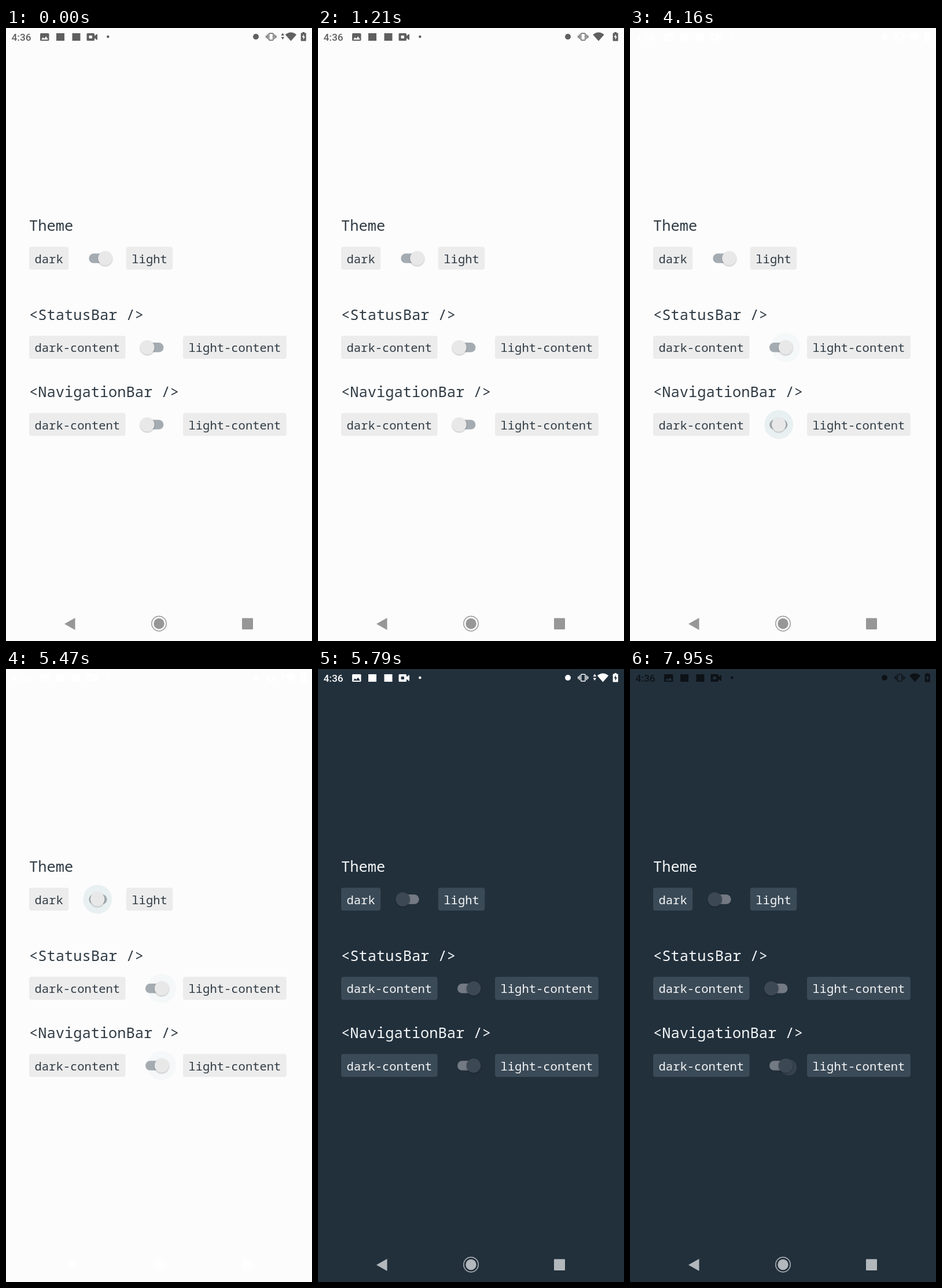
Animation of 529 by 1058 pixels, one loop 8 s. Source, as an HTML page:

```html
<!DOCTYPE html>
<html lang="en">
<head>
<meta charset="utf-8">
<title>System bars demo</title>
<style>
  html, body { margin: 0; width: 100%; height: 100%; overflow: hidden; }
  svg {
    display: block; width: 529px; height: 1058px; background: var(--bg);
    --bg: #fcfcfc; --box: #ececec; --text: #303b44; --track: #a4abb1;
    --thumb: #e8e8e8; --shade: rgba(0, 0, 0, .28); --ripple: #e9f0f1;
  }
  svg.dark {
    --bg: #22303c; --box: #3b4a57; --text: #f4f6f7; --track: #737a83;
    --thumb: #3c4955; --shade: rgba(0, 0, 0, .35); --ripple: #35424f;
  }
  text { font: 20.5px "Noto Sans Mono", "DejaVu Sans Mono", monospace; fill: var(--text); white-space: pre; }
  .title { font-size: 25.4px; font-weight: 500; }
  .box { fill: var(--box); }
  .track { fill: var(--track); }
  .thumb { fill: var(--thumb); filter: drop-shadow(0 1px 1.2px var(--shade)); }
  #status, #nav { fill: currentColor; }
  #status text { font: 500 17.3px Roboto, sans-serif; fill: currentColor; }
  .cut { fill: var(--bg); }
  .line { fill: none; stroke: currentColor; stroke-width: 1.5; }
</style>
</head>
<body>
<svg id="stage" viewBox="0 0 529 1058">
  <g id="status">
    <text x="9.5" y="21.7">4:36</text>
    <rect x="59" y="9" width="15.5" height="13" rx="1.6"/>
    <path class="cut" d="M61 20l3-4 2.2 2.5 3-4 3.600 5.500z"/>
    <rect x="87" y="9" width="14" height="13"/>
    <rect x="114.500" y="9" width="14" height="13"/>
    <path d="M141 9h10.500q1.500 0 1.500 1.500v3l5-3.500v11l-5-3.500v3q0 1.500-1.500 1.500H141q-1.500 0-1.500-1.500v-10Q139.500 9 141 9z"/>
    <rect class="cut" x="143.500" y="13" width="5.500" height="5" rx="1"/>
    <circle cx="176.300" cy="15" r="2.300"/>
    <g id="left">
      <circle cx="432" cy="15" r="5"/>
      <rect class="line" x="454.500" y="9.200" width="7.500" height="11.800" rx="1"/>
      <path class="line" d="M452 11v8M449.800 13v4M464.500 11v8M466.700 13v4"/>
    </g>
    <path id="arrows" d="M475.500 13l2.800-4.500 2.800 4.500zM475.500 15.500l2.800 4.500 2.800-4.500z"/>
    <path id="wifi" d="M-9.700 11.500Q0 3.500 9.700 11.500L0 22.500z"/>
    <path d="M512.500 7h3.500v1.600h2q.8 0 .8.800v12.300q0 .8-.8.800h-7.500q-.8 0-.8-.8V9.400q0-.8.8-.8h2z"/>
    <path class="cut" d="M514.800 10.500l-3 5.500h2v4.500l3.200-6h-2.200z"/>
  </g>
  <g id="nav">
    <path d="M101 1028.500L119.500 1018v21z"/>
    <circle cx="264.500" cy="1028" r="9.200"/>
    <circle class="line" cx="264.500" cy="1028" r="12.700"/>
    <rect x="408" y="1018.500" width="19" height="19.500" rx="1"/>
  </g>
</svg>
<script>
const LOOP = 8000, FPS = 19, SLIDE = 200, THEME_AT = 5500;
const stage = document.getElementById('stage');
const [status, nav, left, arrows, wifi] =
  ['status', 'nav', 'left', 'arrows', 'wifi'].map(id => document.getElementById(id));

// x, y: centre of the switch; on: state at the start; taps: times of each press
const rows = [
  { title: 'Theme', labels: ['dark', 'light'], x: 159, y: 397.5, right: 207.8, on: 1, taps: [5369] },
  { title: '<StatusBar />', labels: ['dark-content', 'light-content'], x: 256.700, y: 551.300, right: 306, on: 0, taps: [2110, 7369] },
  { title: '<NavigationBar />', labels: ['dark-content', 'light-content'], x: 256.700, y: 684.500, right: 306, on: 0, taps: [4055, 7947] },
];

function add(tag, attrs, content = '') {
  const el = document.createElementNS('http://www.w3.org/2000/svg', tag);
  set(el, attrs);
  el.textContent = content;
  return stage.appendChild(el);
}
function set(el, attrs) {
  for (const key in attrs) el.setAttribute(key, attrs[key]);
}
function smooth(p) {
  p = Math.min(1, Math.max(0, p));
  return p * p * (3 - 2 * p);
}

function chip(label, x, y) {
  add('rect', { class: 'box', x, y: y - 20, width: label.length * 12.3 + 19, height: 39.600, rx: 4 });
  add('text', { x: x + 9.5, y: y + 8 }, label);
}

for (const row of rows) {
  add('text', { class: 'title', x: 40, y: row.y - 47.500 }, row.title);
  chip(row.labels[0], 40, row.y);
  chip(row.labels[1], row.right, row.y);
  row.ripple = add('circle', {});
  row.track = add('rect', { class: 'track', x: row.x - 15.700, y: row.y - 8.200, width: 31.400, height: 16.500, rx: 8.200 });
  row.thumb = add('circle', { class: 'thumb', cy: row.y, r: 12.300 });
}

function drawSwitch(row, t, dark) {
  let pos = row.on, tap = -1;
  for (const time of row.taps) {
    if (t < time) break;
    const target = pos > .5 ? 0 : 1;
    pos += (target - pos) * smooth((t - time) / SLIDE);
    if (t - time < SLIDE) { tap = time; break; }
    tap = time;
  }
  const x = row.x - 12.400 + 24.800 * pos;
  row.thumb.setAttribute('cx', x);

  const age = t - tap;
  const pull = Math.max(0, 1 - age / 80);
  const crossed = dark && tap < THEME_AT;
  // a faint halo stays on the light theme
  const rest = tap >= 0 && !dark ? .4 : 0;
  const alpha = tap < 0 ? 0 : Math.max(rest, Math.min(1, (370 - age) / 170));
  set(row.ripple, {
    cx: x + 5 * pull, cy: row.y + 3 * pull,
    r: Math.min(25, 14 + age * .11),
    fill: crossed ? '#878f96' : 'var(--ripple)',
    opacity: Math.max(0, alpha),
  });
}

function drawSignal(t) {
  const active = t < 110 || t >= 950 && t < 1205 || t >= 5420 && t < 7420;
  const off = t < 950 ? 110 : t < 7420 ? 1210 : 7420;
  const shift = active ? 0 : smooth((t - off) / 350);
  arrows.style.display = active ? '' : 'none';
  left.setAttribute('transform', `translate(${8 * shift})`);
  wifi.setAttribute('transform', `translate(${active ? 492.500 : 485 + 7.500 * shift})`);
}

function draw(now) {
  const ms = now % LOOP;
  const t = Math.floor((ms + 5) * FPS / 1000) * 1000 / FPS;
  const dark = t >= THEME_AT;
  stage.classList.toggle('dark', dark);
  status.style.color = t >= 2200 && t < 7470 ? '#fff' : 'rgba(0,0,0,.62)';
  nav.style.color = t >= 4200 ? 'rgba(255,255,255,.66)' : 'rgba(0,0,0,.4)';
  drawSignal(t);
  for (const row of rows) drawSwitch(row, t, dark);
}

const start = performance.now();
(function frame() {
  draw(performance.now() - start);
  requestAnimationFrame(frame);
})();
</script>
</body>
</html>
```
